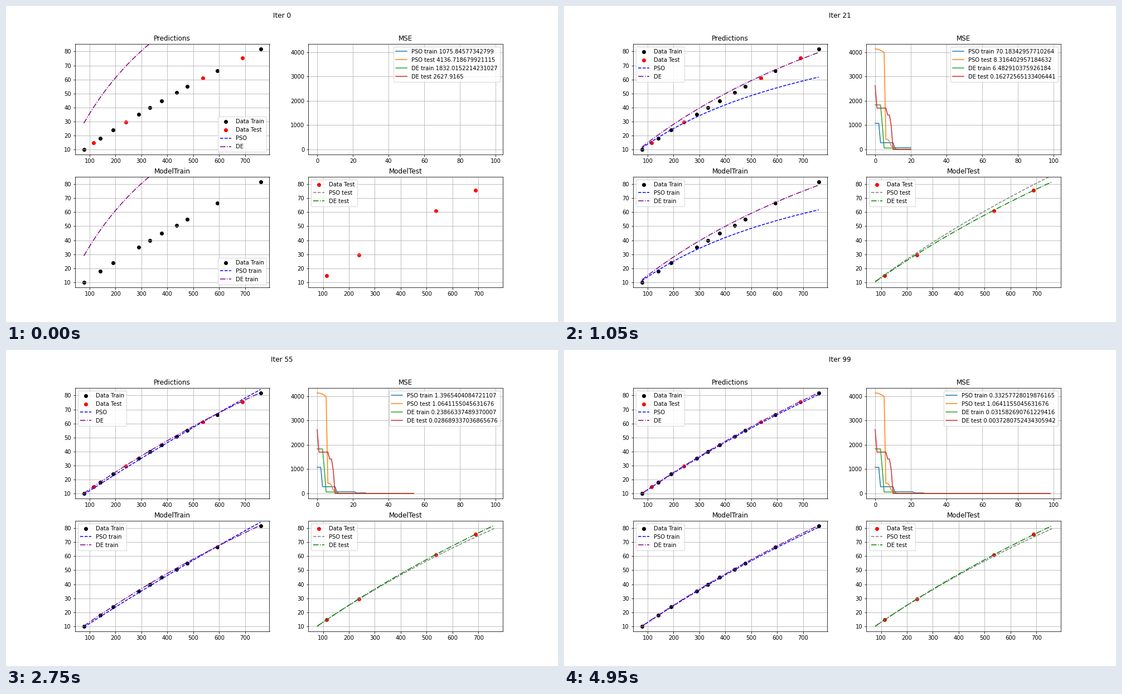
A matplotlib script that plays this animation: 990x566 px, repeating every 5000 ms.

```python
import numpy as np
import matplotlib.pyplot as plt
from matplotlib.animation import FuncAnimation

ITERS = 100
BEST_BEND = 0.00031

# Misra1d data set
X = np.array([77.6, 114.9, 141.1, 190.8, 239.0, 289.0, 332.8,
              378.4, 434.8, 477.3, 536.8, 593.1, 689.1, 760.0])
Y = np.array([10.07, 14.73, 17.94, 23.93, 29.61, 35.18, 40.02,
              44.82, 50.76, 55.05, 61.01, 66.40, 75.47, 81.78])
is_test = np.isin(np.arange(X.size), [1, 4, 10, 12])
TRAIN = X[~is_test], Y[~is_test]
TEST = X[is_test], Y[is_test]
GRID_X = np.linspace(X[0], X[-1], 200)


def step(start, mse, side=1, bend=BEST_BEND):
    """Best solution from iteration start on.

    It lies above (1) or below (-1) the closest fit, or off the plot (0).
    """
    return start, mse, side, bend


def curve(data, mse, side, bend):
    """Curve a*x / (1 + bend*x) whose mean squared error on data is mse."""
    if side == 0:
        return np.full_like(GRID_X, np.nan)
    x, y = data
    g = x / (1 + bend * x)
    gg, gy, yy = np.mean(g * g), np.mean(g * y), np.mean(y * y)
    root = np.sqrt(max(gy * gy - gg * (yy - mse), 0))
    return (gy + side * root) / gg * GRID_X / (1 + bend * GRID_X)


class Run:
    def __init__(self, name, data, *steps):
        self.name = name
        starts = [s[0] for s in steps]
        self.step = np.searchsorted(starts, np.arange(ITERS), side="right") - 1
        self.mse = [steps[k][1] for k in self.step]
        self.curves = [curve(data, *s[1:]) for s in steps]

    def curve_at(self, i):
        return self.curves[self.step[i]]

    def label(self, i):
        return f"{self.name} {self.mse[i]}"


pso_train = Run(
    "PSO train", TRAIN,
    step(0, 1075.84577342799, side=0),
    step(3, 279.38828624582146, -1, 0.000122),
    step(11, 70.18342957710264, -1, 0.0012),
    step(22, 24.61780934521873, -1, 0.0008),
    step(28, 1.3965404084721107, 1, 0.00013),
    step(61, 0.33257728019876165, -1))
pso_test = Run(
    "PSO test", TEST,
    *(step(i, 4136.718679921115 - 6 * i * i, 1, 0.3) for i in range(6)),
    step(6, 419.8362710594823, 1, 0.008),
    step(8, 328.4471920583617, 1, 0.005),
    step(9, 135.61870873429373, -1, 0.00075),
    step(11, 8.316402957184632),
    step(28, 1.0641155045631676, -1, 0.00036))
de_train = Run(
    "DE train", TRAIN,
    step(0, 1832.0152214231027, 1, 0.002),
    step(4, 1003.7290461853972, 1, 0.002),
    step(5, 59.702671563768114, 1, 0.00258),
    step(12, 6.482910375926184, 1, 0.0007),
    step(27, 0.4985965237991373, 1, 0.00022),
    step(50, 0.23866337489370007, 1, 0.00033),
    step(72, 0.22162218794491154, -1),
    step(94, 0.031582690761229416))
de_test = Run(
    "DE test", TEST,
    step(0, 2627.9165, -1),
    step(1, 1703.5820194637285, 1, 0.002),
    step(7, 1418.2093746582913, 1, 0.002),
    step(9, 962.7409183526174, 1, 0.001),
    step(10, 0.7115892351767259, -1, 0.00024),
    step(11, 0.16272565133406441, 1, 0.00036),
    step(40, 0.028689337036865676),
    step(61, 0.014662204294511354),
    step(82, 0.0057920259595894185),
    step(92, 0.0037280752434305942))
runs = [pso_train, pso_test, de_train, de_test]

fig, ((ax_pred, ax_mse), (ax_train, ax_test)) = plt.subplots(
    2, 2, figsize=(990 / 72, 566 / 72), dpi=72)
title = fig.suptitle("Iter 0")
fit_lines = []


def padded(low, high):
    pad = 0.05 * (high - low)
    return low - pad, high + pad


def fit_panel(ax, name, points, fits):
    ax.set_title(name)
    for (x, y), color, label in points:
        ax.scatter(x, y, color=color, label=label)
    for run, color, style, label in fits:
        line, = ax.plot([], [], style, color=color, label=label)
        fit_lines.append((line, run))
    ax.set_xlim(padded(X[0], X[-1]))
    ax.set_ylim(padded(Y[0], Y[-1]))
    ax.set_xticks(range(100, 701, 100))
    ax.set_yticks(range(10, 81, 10))
    ax.grid()
    ax.legend(loc="best")


train_points = (TRAIN, "black", "Data Train")
test_points = (TEST, "red", "Data Test")
fit_panel(ax_pred, "Predictions", [train_points, test_points],
          [(pso_train, "blue", "--", "PSO"), (de_train, "purple", "-.", "DE")])
fit_panel(ax_train, "ModelTrain", [train_points],
          [(pso_train, "blue", "--", "PSO train"),
           (de_train, "purple", "-.", "DE train")])
fit_panel(ax_test, "ModelTest", [test_points],
          [(pso_test, "gray", "--", "PSO test"),
           (de_test, "green", "-.", "DE test")])

ax_mse.set_title("MSE")
mse_lines = [ax_mse.plot([], [], label=run.label(0))[0] for run in runs]
ax_mse.set_xlim(padded(0, ITERS - 1))
ax_mse.set_ylim(padded(0, pso_test.mse[0]))
ax_mse.grid()
mse_texts = ax_mse.legend(loc="best").get_texts()


def update(i):
    title.set_text(f"Iter {i}")
    for line, run in fit_lines:
        y = run.curve_at(i)
        shown = np.isfinite(y)
        line.set_data(GRID_X[shown], y[shown])
    for line, text, run in zip(mse_lines, mse_texts, runs):
        line.set_data(range(i), run.mse[:i])
        text.set_text(run.label(i))
    return []


anim = FuncAnimation(fig, update, frames=ITERS, interval=50,
                     repeat=True, repeat_delay=0)
plt.show()
```
